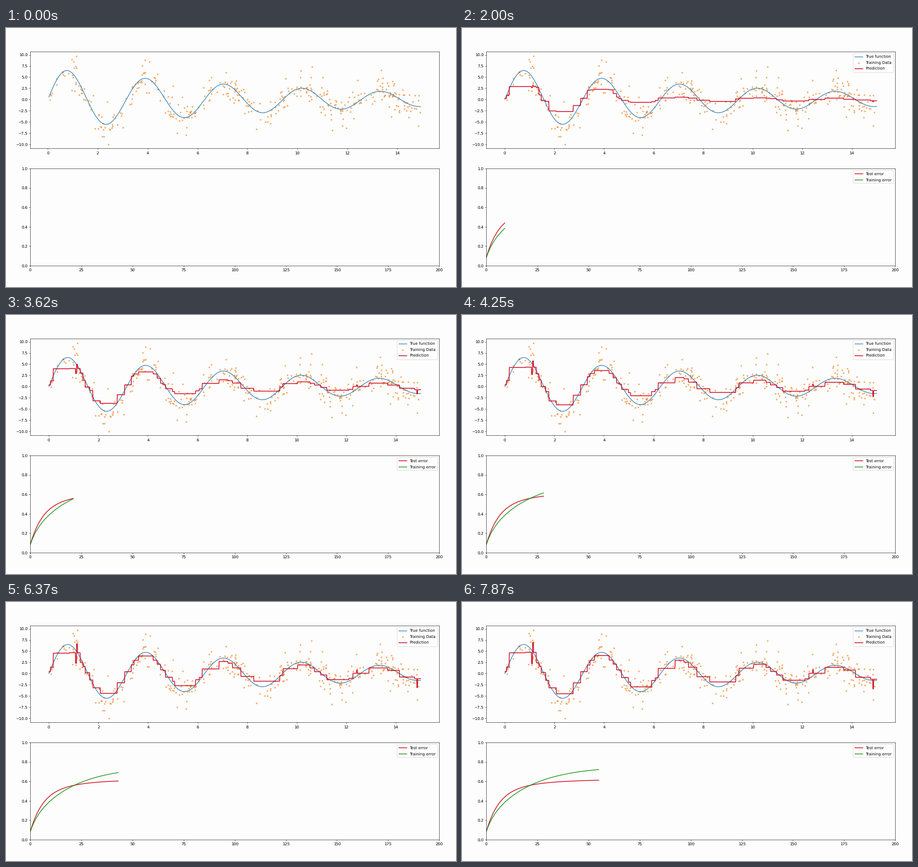
Animation of 800x461 px, one loop 8 s. Source, as a matplotlib script:

```python
import numpy as np
import matplotlib.pyplot as plt
from matplotlib.animation import FuncAnimation

W, H, DPI = 800, 461, 50
FRAMES, STEP, INTRO = 64, 125, 8
PAPER = "#fefdfd"
BLUE, ORANGE, RED, GREEN = "#1f77b4", "#ee8426", "#d0021b", "#0f8f12"

# Splits the model finds first, and those that refine them later.
FIRST = [0, .07, .18, 1.38, 1.47, 1.78, 2.76, 3.06, 3.33, 4.37, 4.51, 4.71,
         4.99, 6.07, 6.19, 7.41, 7.75, 8.27, 9.32, 10.97, 11.22, 12.11, 12.27,
         12.92, 13.67, 14.76]
LATER = [.83, 1.27, 1.65, 2.08, 3.44, 3.62, 4.21, 5.08, 5.92, 6.87, 7.23, 9.45,
         10.04, 10.54, 10.72, 14.15]
# Narrow overfitted spikes: left, right, height.
SPIKES = [(1.08, 1.12, -2.6), (1.12, 1.16, 2.2), (12.42, 12.45, .8),
          (14.85, 14.88, -2.2)]
# The samples that lie farthest from the curve.
STRAYS = [(1.15, 9.7), (.96, 9), (1.02, 8.4), (.95, 2), (1.08, 1.9),
          (1.81, .9), (2.38, -.5), (2.24, -8.2), (2.42, -10), (3.02, -6.2),
          (3.9, 8.8), (4.08, 8.4), (3.96, 1.6), (5.01, 3), (5.39, .5),
          (5.53, -7.9), (5.17, -7.5), (8.36, -6.6), (8.93, -5.3), (9.52, 4.7),
          (10.13, 6.4), (10.59, 7.3), (11.02, 4.9), (11.4, -6.9),
          (11.81, -5.8), (11.97, -6.3), (12.42, 4.3), (13.36, 6.5),
          (13.76, -3.9), (14.85, -5.9)]

grid = np.linspace(0, 15, 1501)
rounds = np.arange(FRAMES)


def truth(x):
    return 7 * np.exp(-x / 10) * np.sin(2 * x)


def samples(count=360):
    rng = np.random.default_rng(4)
    x = rng.uniform(.05, 14.94, count)
    y = truth(x) + np.clip(rng.normal(0, 1.5, count), -3, 3)
    sx, sy = np.array(STRAYS).T
    return np.r_[x, sx], np.r_[y, sy]


def stairs(edges):
    """Mean of the curve between neighbouring edges."""
    part = np.searchsorted(edges, grid, side="right") - 1
    means = np.bincount(part, truth(grid)) / np.bincount(part)
    return means[part]


def learned(n, tau, power):
    return 1 - np.exp(-(n / tau) ** power)


coarse = stairs(FIRST)
detail = stairs(sorted(FIRST + LATER)) - coarse
for left, right, height in SPIKES:
    detail[(grid >= left) & (grid < right)] += height


def prediction(n):
    # The large swings on the left are learned first.
    share = np.where(grid < 4.6, learned(n, 9, .8), learned(n, 28, 1.3))
    return .9 * share * coarse + learned(n, 28, 2) * detail


def rounds_at(frame):
    """Boosting rounds shown; the playback stutters twice."""
    k = frame - INTRO
    if k < 19:
        return k + 1
    if k < 21:
        return 21
    return k + 2 if k < 40 else k + 1


test_err = .62 - .38 * np.exp(-rounds / 6) - .155 * np.exp(-rounds / 19)
train_err = .76 - .579 * np.exp(-rounds / 20.3) - .096 * np.exp(-rounds / 3)

plt.rcParams.update({"font.family": "DejaVu Sans", "font.size": 10,
                     "text.hinting": "none", "legend.labelspacing": .55})
fig = plt.figure(figsize=(W / DPI, H / DPI), dpi=DPI, facecolor=PAPER)


def panel(top, bottom):
    return fig.add_axes([43.2 / W, 1 - bottom / H, 727 / W, (bottom - top) / H],
                        facecolor=PAPER)


top = panel(41.6, 214.5)
low = panel(250, 423)
top.set_ylim(-10.94, 10.75)
low.set_xlim(0, 200)
low.set_ylim(0, 1)

true_line, = top.plot([], [], color=BLUE, lw=1.5, label="True function")
dots = top.scatter(*samples(), s=18, color=ORANGE, alpha=.65, lw=0, zorder=1,
                   label="Training Data")
fit_line, = top.plot([], [], color=RED, lw=1.9, label="Prediction")
test_line, = low.plot([], [], color=RED, lw=1.8, label="Test error")
train_line, = low.plot([], [], color=GREEN, lw=1.7, label="Training error")

top_key = top.legend(handles=[true_line, dots, fit_line], loc="upper right")
low_key = low.legend(loc="upper right")


def draw(frame):
    started = frame >= INTRO
    for artist in (fit_line, test_line, train_line, top_key, low_key):
        artist.set_visible(started)
    # Before the fit, the curve spans only the sampled range.
    start, end = (0, 15) if started else (.04, 14.945)
    margin = .05 * (end - start)
    top.set_xlim(start - margin, end + margin)
    x = np.linspace(start, end, 600)
    true_line.set_data(x, truth(x))
    if started:
        n = rounds_at(frame)
        fit_line.set_data(grid, prediction(n))
        test_line.set_data(rounds[:n + 1], test_err[:n + 1])
        train_line.set_data(rounds[:n + 1], train_err[:n + 1])
    return true_line, fit_line, test_line, train_line


anim = FuncAnimation(fig, draw, frames=FRAMES, interval=STEP, repeat=True,
                     repeat_delay=0, blit=False)
plt.show()
```
